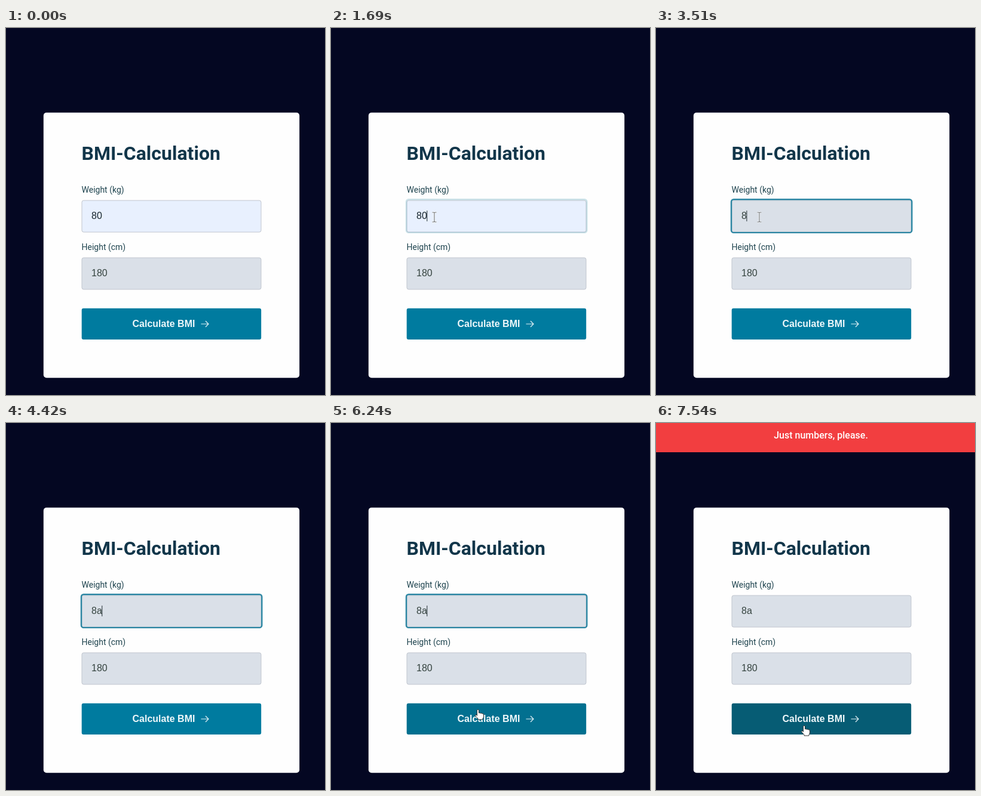
An HTML page for the animation above (8 s loop, 534 px wide and 615 px high).

```html
<!DOCTYPE html>
<html lang="en">
<head>
<meta charset="utf-8">
<title>BMI-Calculation</title>
<style>
  html, body { margin: 0; width: 100%; height: 100%; overflow: hidden; background: #040722; }
  svg { display: block; width: 534px; height: 615px; }
  text { white-space: pre; }
  .roboto { font-family: Roboto, sans-serif; fill: #12364a; }
  .arial { font: 16px "Liberation Sans", Arial, sans-serif; fill: #35433f; }
  .label { font-size: 14px; fill: #1f444f; }
  .box { fill: #dae0e8; stroke: #c0c5ce; }
</style>
</head>
<body>
<svg viewBox="0 0 534 615">
  <rect width="534" height="615" fill="#040722"/>
  <rect x="62.8" y="141.8" width="428.4" height="444.4" rx="5" fill="#fefefe"/>
  <text class="roboto" x="126.5" y="221" font-size="32" font-weight="700">BMI-Calculation</text>

  <text class="roboto label" x="126.5" y="276">Weight (kg)</text>
  <rect id="weight" class="box" x="127" y="289" width="300" height="53" rx="3"/>
  <rect id="ring" x="126" y="287.3" width="302.3" height="55.6" rx="4" fill="none" stroke="#2b86a3" stroke-width="2.4"/>
  <text id="value" class="arial" x="143" y="320"></text>
  <rect id="caret" y="306" width="1" height="18" fill="#222e33"/>

  <text class="roboto label" x="126.5" y="372">Height (cm)</text>
  <rect class="box" x="127" y="385" width="300" height="53" rx="3"/>
  <text class="arial" x="143" y="416">180</text>

  <rect id="button" x="126.7" y="469.7" width="300.5" height="52.4" rx="3"/>
  <text class="arial" x="211.5" y="501" style="font-weight:700;fill:#eef7fa">Calculate BMI</text>
  <path d="M326.5 496H339M334 491L339 496L334 501" fill="none" stroke="#e6f3f7" stroke-width="1.2"/>

  <g id="bar">
    <rect width="534" height="49" fill="#f23e40"/>
    <text class="roboto" x="276" y="26" font-size="16" font-weight="500" text-anchor="middle" style="fill:#fff">Just numbers, please.</text>
  </g>

  <g id="cursor">
    <path id="arrow" d="M0 0V16L3.7 12.6L6.2 18L9 16.8L6.6 11.5H11.5Z" fill="#080808" stroke="#fff" stroke-width="1"/>
    <g id="beam" fill="none">
      <path d="M-3.5 -8H-1L0 -7L1 -8H3.5M0 -7V7M-3.5 8H-1L0 7L1 8H3.5" stroke="#fff" stroke-width="2.4"/>
      <path d="M-3.5 -8H-1L0 -7L1 -8H3.5M0 -7V7M-3.5 8H-1L0 7L1 8H3.5" stroke="#6b6f73" stroke-width="1.1"/>
    </g>
    <path id="hand" d="M-1.5 1Q0 -1 1.5 1V6Q3 5 4.5 6.5Q6 5.5 7.2 7Q9.5 6.3 9.5 9V12Q9.3 14 8 15.5V17H0V15.5L-4.5 10.5Q-5.2 8.5 -3 9L-1.5 10.3Z" fill="#fff" stroke="#222" stroke-width=".9"/>
  </g>
</svg>
<script>
const LOOP = 8000, TICK = 130;
const FOCUS = 1690, ERASE = 3510, TYPE = 4160, HOVER = 6170, CLICK = 7020;

const caretSteps = [[0, 0], [FOCUS, 1], [2860, 0], [3120, 1], [4030, 0], [TYPE, 1],
  [4680, 0], [5200, 1], [5720, 0], [6240, 1], [6630, 0]];
const valueSteps = [[0, "80"], [ERASE, "8"], [TYPE, "8a"]];
const moveIn = [[650, 214, 454], [910, 201, 412], [1040, 191, 380], [1170, 182, 346], [1430, 173, 317]];
const moveOut = [[5590, 175, 320], [5850, 204, 380], [6110, 238, 462], [6240, 246, 480], [6500, 248, 507]];

const $ = id => document.getElementById(id);
const show = (id, on) => $(id).setAttribute("visibility", on ? "visible" : "hidden");
const clamp = x => Math.min(1, Math.max(0, x));
const ramp = (t, start, length) => clamp((t - start) / length);
const easeOut = x => 1 - (1 - x) ** 3;
const stepAt = (steps, t) => steps.filter(s => s[0] <= t).pop()[1];

function pointAt(path, t) {
  const next = path.findIndex(p => p[0] > t);
  if (next < 0) return path[path.length - 1].slice(1);
  const a = path[next - 1], b = path[next];
  const k = (t - a[0]) / (b[0] - a[0]);
  return [a[1] + (b[1] - a[1]) * k, a[2] + (b[2] - a[2]) * k];
}

function mix(from, to, k) {
  return `rgb(${from.map((c, i) => Math.round(c + (to[i] - c) * k))})`;
}

function drawCursor(t) {
  const path = t >= 5590 ? moveOut : t >= 650 && t < TYPE ? moveIn : null;
  let kind = "";
  if (path) {
    const [x, y] = pointAt(path, t);
    const inField = (y > 289 && y < 342) || (y > 385 && y < 438);
    kind = inField ? "beam" : y > 470 && y < 522 ? "hand" : "arrow";
    $("cursor").setAttribute("transform", `translate(${x} ${y})`);
  }
  for (const id of ["arrow", "beam", "hand"]) show(id, id === kind);
}

function draw(t) {
  const value = stepAt(valueSteps, t);
  const filled = t < ERASE;
  $("value").textContent = value;
  $("value").style.fill = filled ? "#17262c" : "";
  $("weight").style.fill = filled ? "#e8f0fe" : "";
  $("ring").setAttribute("opacity", ramp(t, FOCUS - 100, 400) * (1 - ramp(t, CLICK - 100, 300)));
  $("caret").setAttribute("x", 142.5 + value.length * 8.9);
  show("caret", stepAt(caretSteps, t));
  $("button").setAttribute("fill", mix([0, 123, 159], [6, 92, 116], ramp(t, HOVER, 200)));
  const drop = easeOut(ramp(t, CLICK - 50, 500));
  $("bar").setAttribute("transform", `translate(0 ${-49 * (1 - drop)})`);
  show("bar", drop > 0);
  drawCursor(t);
}

const start = performance.now();
function loop() {
  const t = (performance.now() - start) % LOOP;
  draw(Math.floor(t / TICK) * TICK);
  requestAnimationFrame(loop);
}
loop();
</script>
</body>
</html>
```
